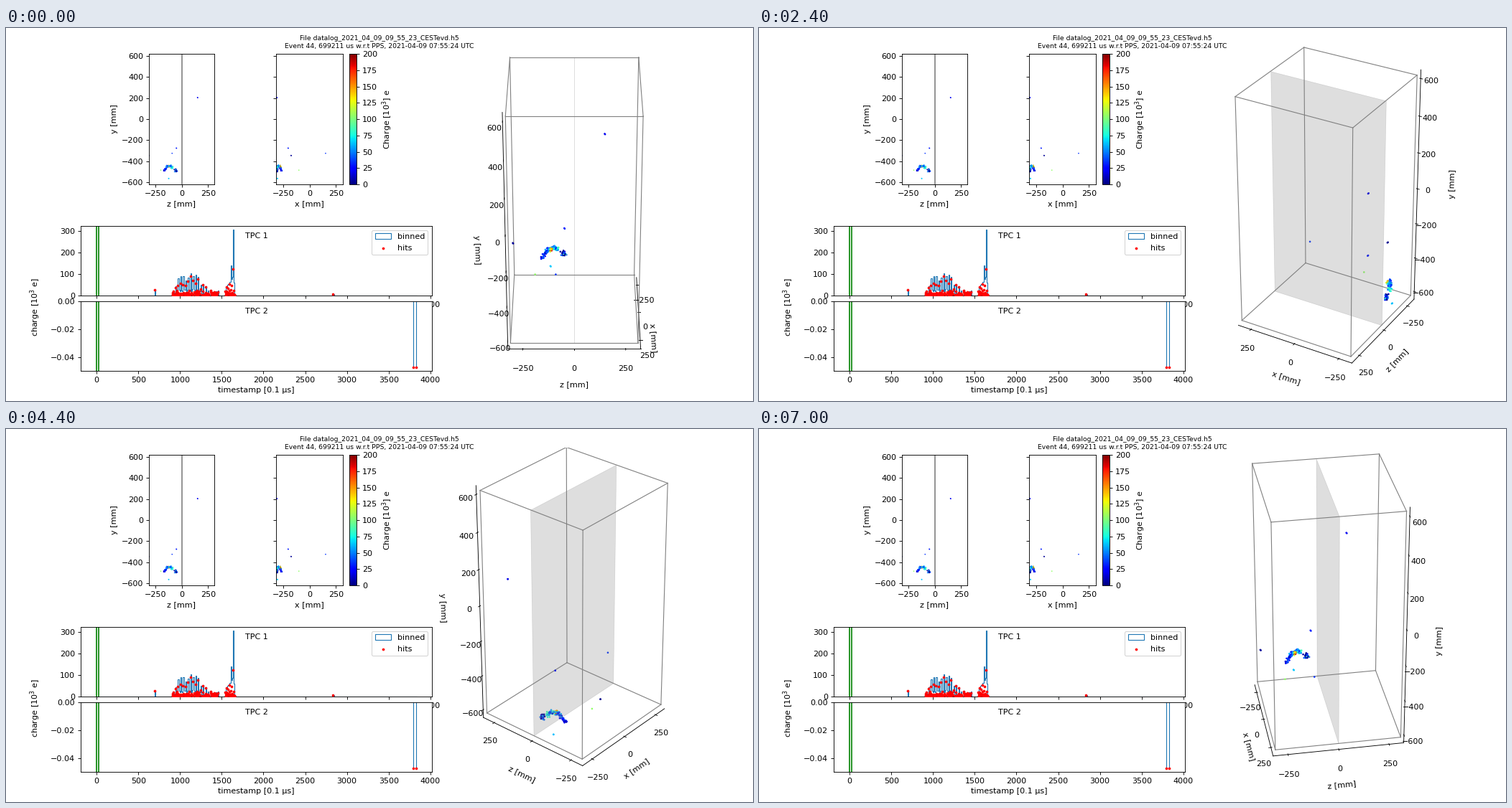
Write a matplotlib script that moves like this. It is 1040 by 520 pixels and loops after 7.2 s.

```python
import itertools

import numpy as np
import matplotlib.pyplot as plt
from matplotlib.animation import FuncAnimation
from mpl_toolkits.mplot3d.art3d import Poly3DCollection

W, H, DPI = 1040, 520, 80
FRAMES, INTERVAL = 36, 200
HALF, HALF_Y = 310, 620          # detector half sizes in mm
BLUE, RED = "tab:blue", "red"

plt.rcParams.update({"font.family": "DejaVu Sans", "font.size": 10})
rng = np.random.default_rng(44)
fig = plt.figure(figsize=(W / DPI, H / DPI), dpi=DPI, facecolor="white")
fig.suptitle("File datalog_2021_04_09_09_55_23_CESTevd.h5\n"
             "Event 44, 699211 us w.r.t PPS, 2021-04-09 07:55:24 UTC",
             size="small")


def pixel_axes(left, top, right, bottom):
    return fig.add_axes([left / W, 1 - bottom / H,
                         (right - left) / W, (bottom - top) / H])


def make_hits():
    """Rows of x, y, z, charge: a curved track, a blob and stray hits."""
    n = 100
    u = np.linspace(0, 1, n)
    noise = rng.normal(0, 4.5, (3, n))
    hot = np.exp(-((u - 0.55) / 0.2) ** 2) * rng.random(n) ** 1.5
    charge = 8 + 35 * rng.random(n) + 165 * hot + 40 * (u > 0.85)
    # The hottest hits lie on the inner side of the track.
    track = np.column_stack([
        -264 - 44 * u + noise[0] + 14 * hot,
        -446 - 120 * (u - 0.62) ** 2 + noise[1],
        -166 + 82 * u + noise[2], charge])
    n = 30
    blob = np.column_stack([
        rng.normal(-304, 4, n), rng.normal(-490, 8, n),
        rng.normal(-55, 7, n), 4 + 110 * rng.random(n) ** 4])
    stray = np.array([
        [-308, 205, 150, 18], [-202, -275, -50, 28], [-174, -345, -309, 2],
        [-303, -563, -123, 62], [152, -325, -90, 35], [-100, -485, -197, 105]])
    pairs = stray[:4] + [2, -2, 2, 3]
    hits = np.vstack([track, blob, stray, pairs])
    hits[:, 0] = np.maximum(hits[:, 0], -HALF)
    return hits


hx, hy, hz, charge = make_hits().T
color_map = dict(c=charge, cmap="jet", vmin=0, vmax=200)
mm_ticks = [-250, 0, 250]
y_ticks = range(-600, 601, 200)

# Flat projections
ax_zy = pixel_axes(199, 36, 290, 218)
ax_xy = pixel_axes(376, 36, 469, 218)
for ax, values, name, limit in ((ax_zy, hz, "z", 309), (ax_xy, hx, "x", 315)):
    dots = ax.scatter(values, hy, s=2.2, linewidths=0, **color_map)
    ax.set(xlim=(-limit, limit), ylim=(-HALF_Y, HALF_Y), xticks=mm_ticks,
           yticks=y_ticks, xlabel=f"{name} [mm]")
ax_zy.set_ylabel("y [mm]")
ax_zy.axvline(0, color="gray", lw=1.5)
ax_xy.tick_params(labelleft=False)
fig.colorbar(dots, cax=pixel_axes(478, 36, 488, 218),
             ticks=range(0, 201, 25), label="Charge [$10^3$] e")

# Charge against time
ax_t1 = pixel_axes(104, 276, 593, 373)
ax_t2 = pixel_axes(104, 381, 593, 478)
BIN = 10


def early_charge(t):
    """Regular narrow peaks under a slowly falling envelope."""
    envelope = 22 + 85 / (1 + np.exp((t - 1260) / 35))
    ramp = np.clip((t - 895) / 80, 0.1, 1)
    comb = 0.25 + 0.75 * (np.arange(t.size) % 3 == 1)
    return envelope * ramp * comb * rng.uniform(0.65, 1.1, t.size)


def late_charge(t):
    return np.interp(t, [1535, 1595, 1605, 1615, 1625, 1635, 1645],
                     [35, 62, 140, 75, 85, 306, 60])


early_t = np.arange(905, 1460, BIN)
late_t = np.arange(1545, 1650, BIN)
early_q, late_q = early_charge(early_t), late_charge(late_t)
lone_t, lone_q = [700, 2835], [26, 5]
ax_t1.hist(np.concatenate([early_t, late_t, lone_t]),
           bins=np.arange(-BIN / 2, 3840, BIN),
           weights=np.concatenate([early_q, late_q, lone_q]),
           histtype="step", color=BLUE, lw=1, label="binned")

base_t = np.concatenate([rng.uniform(908, 1455, 115),
                         rng.uniform(1538, 1658, 45)])
base_q = 3 + np.minimum(rng.exponential(6, base_t.size), 22)
peak_t = np.concatenate([early_t[1::3], late_t[1::2]])
peak_q = np.concatenate([early_q[1::3], late_q[1::2]])
peak_q = np.minimum(peak_q * rng.uniform(0.5, 0.95, peak_q.size), 122)
dot = dict(s=8, linewidths=0.5, color=RED, zorder=3)
ax_t1.scatter(np.concatenate([lone_t, peak_t, base_t]),
              np.concatenate([lone_q, peak_q, base_q]), label="hits", **dot)

pair_t, pair_q = [3797, 3829], -0.0476
ax_t2.vlines(pair_t, pair_q, 0, color=BLUE, lw=1)
ax_t2.scatter(pair_t, [pair_q] * 2, **dot)

for ax, name in ((ax_t1, "TPC 1"), (ax_t2, "TPC 2")):
    for t in (0, 26):
        ax.axvline(t, color="green", lw=1.5)
    ax.set(xlim=(-191, 4019), xticks=range(0, 4001, 500))
    ax.text(0.5, 0.825, name, ha="center", va="baseline",
            transform=ax.transAxes)
ax_t1.set(ylim=(0, 321.6), yticks=range(0, 301, 100))
ax_t2.set(ylim=(-0.05, 0), yticks=[0, -0.02, -0.04],
          xlabel="timestamp [0.1 µs]")
ax_t2.yaxis.set_major_formatter("{x:.2f}")
ax_t2.set_yticklabels(["0.00", "−0.02", "−0.04"])
ax_t1.legend(loc="upper right")
fig.text(40.5 / W, 1 - 389.5 / H, "charge [$10^3$ e]", rotation=90,
         ha="center", va="center")

# Rotating detector, with the vertical axis showing y
ax3d = fig.add_axes([0.5425, 0.1, 0.425, 0.85], projection="3d")
ax3d.patch.set_visible(False)
ax3d.grid(False)

corners = list(itertools.product((-1, 1), repeat=3))
for a, b in itertools.combinations(corners, 2):
    if sum(p != q for p, q in zip(a, b)) == 1:
        ends = np.array([a, b]).T * [[HALF], [HALF], [HALF_Y]]
        ax3d.plot(*ends, color="gray", lw=1)

plane = [(-HALF, 0, -HALF_Y), (HALF, 0, -HALF_Y),
         (HALF, 0, HALF_Y), (-HALF, 0, HALF_Y)]
shade = (0.5, 0.5, 0.5, 0.26)
ax3d.add_collection3d(Poly3DCollection([plane], facecolors=[shade],
                                       edgecolors=[shade], linewidths=0.6))
ax3d.scatter(hx, hz, hy, s=5.5, linewidths=0, depthshade=False, **color_map)

margin = 25 / 24
ax3d.set_xlim(-HALF * margin, HALF * margin)
ax3d.set_ylim(-HALF * margin, HALF * margin)
ax3d.set_zlim(-HALF_Y * margin, HALF_Y * margin)
ax3d.set_box_aspect((1, 1, 2))
ax3d.set(xlabel="x [mm]", ylabel="z [mm]",
         xticks=mm_ticks, yticks=mm_ticks, zticks=y_ticks)
ax3d.set_zlabel("y [mm]", labelpad=20)
for axis in (ax3d.xaxis, ax3d.yaxis, ax3d.zaxis):
    axis.set_pane_color((1, 1, 1, 0))


def update(i):
    # The tiny offset keeps the axis sides stable in edge-on views.
    ax3d.view_init(elev=30, azim=i * 360 / FRAMES + 1e-6)
    return []


anim = FuncAnimation(fig, update, frames=FRAMES, interval=INTERVAL,
                     init_func=lambda: update(0), repeat=True,
                     repeat_delay=0, blit=False)
plt.show()
```
